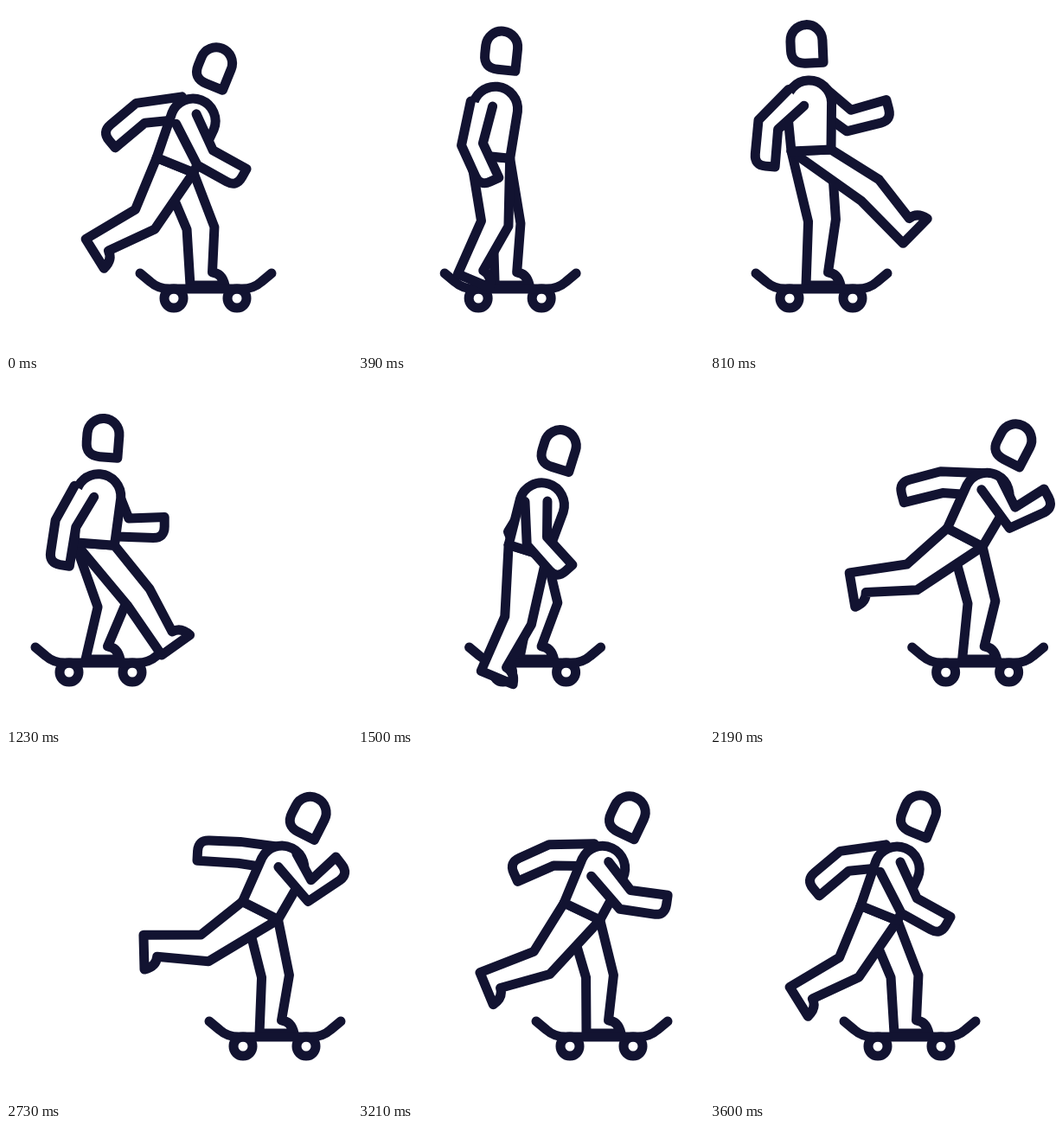
Recreate the animation shown at these times as an HTML page. Size 400 by 400 pixels, loop 3630 ms.

```html
<!DOCTYPE html>
<html lang="en">
<head>
<meta charset="utf-8">
<title>Skateboarder</title>
<style>
  html, body { margin: 0; height: 100%; overflow: hidden; background: #fff; }
  svg { display: block; width: 100vw; height: 100vh; }
  path, circle { fill: #fff; stroke: #121331; stroke-width: 11; stroke-linecap: round; stroke-linejoin: round; }
  .deck { fill: none; }
</style>
</head>
<body>
<svg viewBox="0 0 400 400">
  <path id="farArm"/>
  <path id="standLeg"/>
  <g id="board">
    <circle cy="338" r="11"/>
    <circle cx="73" cy="338" r="11"/>
    <path class="deck" d="M-39 309l12 10q9 8 22 8h84q13 0 22-8l12-10"/>
  </g>
  <path id="pushLeg"/>
  <g id="body">
    <path d="M-23 0L-26-55A26 26 0 0 1 26-55L23 0Z"/>
    <path d="M18.5-101H-2Q-18.5-101-18.5-117V-127A18.5 18.5 0 0 1 18.5-127Z"/>
  </g>
  <path id="nearArm"/>
</svg>
<script>
const LOOP = 3630, CYCLE = 3600, STEP = 30;

// Rows are [time, ...values]; angles in degrees from straight down, forward positive.
const tracks = {
  board: [[0, 194], [540, 120], [810, 92], [1095, 67], [1230, 73], [1430, 140],
          [1620, 212], [1770, 244], [2050, 268], [2400, 276], [2730, 274], [3210, 245]],
  // hip offset from board, hip height, lean
  body: [[0, 1.5, 184, 22], [540, 19, 170, 1], [810, 25, 167, -2.5], [1230, 29.5, 189.5, 4.5],
         [1430, 29, 198, 14], [1770, 25, 190.5, 27], [2200, 22, 182, 27.5],
         [2730, 20, 181, 27], [3210, 14, 182, 25.5]],
  // shoulder x, upper arm, forearm
  farArm: [[0, -16, -83, -50], [810, 7, 52, 105], [1230, 6.5, 25, 90],
           [1770, -10, -83, -45], [2730, -5, -98, -93], [3210, -15, -90, -66]],
  // shoulder x, y, side, upper arm, its length, forearm
  nearArm: [[0, .6, -64, -1, 26, 50, 61], [810, -6, -52, -1, -46, 45, -5],
            [1230, -5, -54, -1, -30, 43, -9], [1770, -10, -60, 1, 27, 48.5, 100],
            [2730, -4, -55, .95, 36, 43.5, 128], [3210, 3, -65, -1, 39.5, 46, 82]],
  // thigh, its length, shin
  pushLeg: [[0, -29, 71.5, -61.5], [400, 5, 78, -25], [810, 56, 82, 42], [1230, 39.5, 79.5, 32],
            [1430, 5, 82, -12], [1770, -47.5, 76, -69], [2730, -56, 77.5, -92], [3210, -38, 75.5, -71]],
  // knee offset from board, knee height
  standLeg: [[0, 31, 257], [810, 37.5, 248], [1230, 49, 261],
             [1770, 44.5, 257], [2730, 37.5, 257], [3210, 34.5, 257]]
};

// Periodic monotone cubic interpolation of every column of a track.
function sample(track, t) {
  const n = track.length;
  const key = (i, c) => track[(i + n) % n][c] + (c ? 0 : CYCLE * Math.floor(i / n));
  const slope = (i, c) => (key(i + 1, c) - key(i, c)) / (key(i + 1, 0) - key(i, 0));
  const tangent = (i, c) => {
    const a = slope(i - 1, c), b = slope(i, c);
    return a * b > 0 ? 2 * a * b / (a + b) : 0;
  };
  let i = 0;
  while (i < n - 1 && track[i + 1][0] <= t) i++;
  const span = key(i + 1, 0) - key(i, 0), u = (t - key(i, 0)) / span, v = 1 - u;
  return track[0].slice(1).map((_, k) => {
    const c = k + 1;
    return key(i, c) * v * v * (1 + 2 * u) + key(i + 1, c) * u * u * (3 - 2 * u)
      + span * u * v * (tangent(i, c) * v - tangent(i + 1, c) * u);
  });
}

// Point reached from p by going len along an angle and side to its front.
function go([x, y], angle, len, side = 0) {
  const r = angle * Math.PI / 180, s = Math.sin(r), c = Math.cos(r);
  return [x + len * s + side * c, y + len * c - side * s];
}

const pt = p => p.map(v => v.toFixed(2)).join(" ");
const line = (...points) => points.map(pt).join("L");
const el = id => document.getElementById(id);
const setPath = (id, d) => el(id).setAttribute("d", d);

function arm(start, upper, upperLen, fore) {
  const elbow = go(start, upper, upperLen), bend = (upper + fore) / 2, len = 48;
  return "M" + line(go(start, upper, 0, 13), go(elbow, bend, 0, 12.5),
                    go(elbow, fore, len, 12), go(elbow, fore, len, 1))
    + "Q" + pt(go(elbow, fore, len, -12)) + " "
    + line(go(elbow, fore, len - 13, -12), go(elbow, bend, 0, -12.5), go(start, upper, 0, -13));
}

function leg(back, front, knee, bend, heel, sole) {
  return "M" + line(back, go(knee, bend, 0, -16), heel, go(heel, sole, 40))
    + "Q" + pt(go(heel, sole, 37, 14)) + " "
    + line(go(heel, sole, 25.5, 15), go(knee, bend, 0, 16), front) + "Z";
}

function draw(t) {
  const pose = {};
  for (const name in tracks) pose[name] = sample(tracks[name], t);

  const [boardX] = pose.board, [hipX, hipY, lean] = pose.body;
  const hip = [boardX + hipX, hipY];
  const onBody = (x, y) => go(hip, -lean, y, x);
  const back = onBody(-23, 0), front = onBody(23, 0);

  el("board").setAttribute("transform", `translate(${boardX})`);
  el("body").setAttribute("transform", `translate(${hip}) rotate(${lean})`);

  const [farX, farUpper, farFore] = pose.farArm;
  setPath("farArm", arm(onBody(farX, -65), farUpper, 50, farFore));

  const [nearX, nearY, side, upper, upperLen, fore] = pose.nearArm;
  setPath("nearArm", arm(go(onBody(nearX, nearY), upper, 0, 13 * side), upper, upperLen, fore));

  const [kneeX, kneeY] = pose.standLeg;
  setPath("standLeg", leg(back, front, [boardX + kneeX, kneeY], 5, [boardX + 19, 323], 90));

  const [thigh, thighLen, shin] = pose.pushLeg;
  const knee = go(hip, thigh, thighLen), sole = shin + 93.5;
  const heel = go(go(knee, shin, 70.5), sole, -12.75);
  setPath("pushLeg", leg(back, front, knee, (thigh + shin) / 2, heel, sole));
}

const begin = performance.now();
function tick() {
  const t = (performance.now() - begin) % LOOP;
  draw(Math.floor(t / STEP) * STEP % CYCLE);
  requestAnimationFrame(tick);
}
tick();
</script>
</body>
</html>
```
